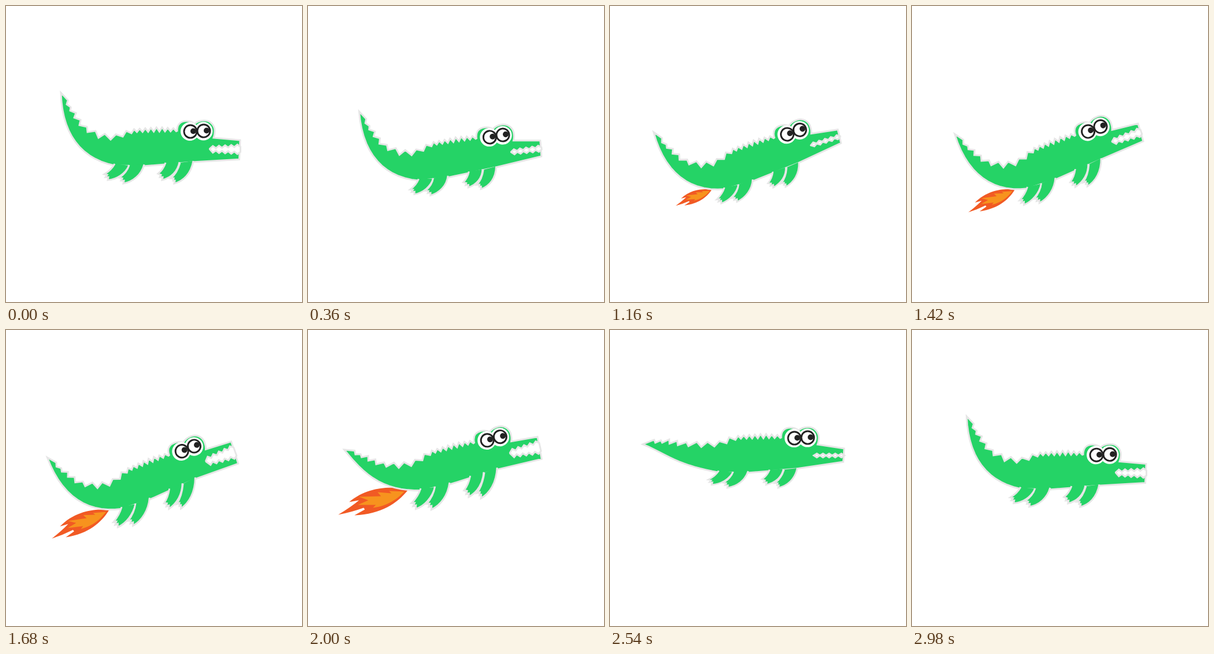
Animation of 512x512 px, one loop 3000 ms. Source, as an HTML page:

```html
<!DOCTYPE html>
<html lang="en">
<head>
<meta charset="utf-8">
<title>Rocket crocodile</title>
<style>
  html, body { margin: 0; width: 100%; height: 100%; overflow: hidden; background: #fff; }
  svg { display: block; width: 100vw; height: 100vh; }
  .skin { fill: #25d366; }
  .line { stroke: #e6e6e6; stroke-width: 3; stroke-miterlimit: 6; }
  .white { fill: #fff; }
  .ink { fill: #222; }
</style>
</head>
<body>
<svg viewBox="0 0 512 512">
  <g id="croc">
    <g id="flame">
      <path fill="#f15a24" d="M0 0C-18 -7 -65 -10 -101 20L-84 17Q-97 28 -120 42Q-98 38 -76 30L-74 33L-92 43C-45 41 -18 22 0 0Z"/>
      <path fill="#f7931e" d="M-6 2L-32 1L-28 5L-52 3L-46 10L-84 11L-68 17L-86 25L-55 25L-60 30C-35 27 -18 15 -6 2Z"/>
    </g>
    <path id="body" class="skin line"/>
    <g id="legs" class="skin line">
      <path d="M188 273Q182 284 170 291L175 292L172 296L177 296L176 301C192 300 206 290 213 276"/>
      <path d="M213 275Q209 288 196 297L201 298L199 302L204 302L203 307C220 304 234 292 239 274"/>
      <path d="M276 271Q272 283 263 290L268 292L266 296L271 296L270 301C286 297 297 286 300 270"/>
      <path d="M301 271Q296 289 285 298L290 298L289 302L292 302L291 307C307 303 320 290 324 268"/>
    </g>
    <path id="mouth" class="white line"/>
    <g id="eyes">
      <circle class="white" cx="318" cy="217" r="16"/>
      <circle class="white" cx="341.5" cy="216.5" r="16"/>
      <circle class="ink" cx="319" cy="217" r="12.5"/>
      <circle class="white" cx="319" cy="217" r="9.6"/>
      <circle class="ink" cx="324" cy="216.5" r="5"/>
      <circle class="ink" cx="342" cy="216" r="12.5"/>
      <circle class="white" cx="342" cy="216" r="9.6"/>
      <circle class="ink" cx="347" cy="215.5" r="5"/>
    </g>
  </g>
</svg>
<script>
  const LOOP = 3000;
  const byId = id => document.getElementById(id);
  const croc = byId('croc'), flame = byId('flame'), body = byId('body'),
        legs = byId('legs'), mouth = byId('mouth');

  const times = [0, 360, 800, 1160, 1680, 2000, 2170, 2350, 2540, 2760];
  const keys = {
    y:    [0, 17.6, 23, 22, 12, -13, -28, -36, -30, -14],
    turn: [0, -7.2, -13, -17, -19.7, -12.8, -8, -3, 0, 0],
    tail: [0, 3.1, 3, 2.3, 0.7, -13.8, -26, -36, -34.8, -11],
    leg:  [1, 0.91, 0.87, 0.88, 1.09, 1.17, 1.12, 0.97, 0.87, 0.92],
    skew: [0, 0.05, 0.02, -0.04, -0.22, -0.155, -0.1, -0.04, 0, 0],
    jaw:  [0.6, 0.25, 0.05, 0.05, 1, 0.95, 0.75, 0.3, 0, 0.15]
  };
  const burn = [[700, 0], [1160, 0.53], [1680, 0.863], [2000, 1], [2190, 1.14], [2420, 0]];

  // Smooth periodic curve through the keys
  function curve(v, t) {
    const n = times.length;
    const at = i => times[(i + n) % n] + LOOP * Math.floor(i / n);
    const val = i => v[(i + n) % n];
    const slope = i => (val(i + 1) - val(i - 1)) / (at(i + 1) - at(i - 1));
    let i = n - 1;
    while (times[i] > t) i--;
    const d = at(i + 1) - at(i), u = (t - at(i)) / d, w = 1 - u;
    return val(i) * w * w * (1 + 2 * u) + val(i + 1) * u * u * (3 - 2 * u)
      + d * u * w * (slope(i) * w - slope(i + 1) * u);
  }

  function linear(pts, t) {
    for (let i = 1; i < pts.length; i++) {
      const [a, p] = pts[i - 1], [b, q] = pts[i];
      if (t >= a && t < b) return p + (q - p) * (t - a) / (b - a);
    }
    return 0;
  }

  // Upper tail edge from the tip to the back
  const ridge = [
    [95, 150], [107, 163], [105, 170], [112, 175], [111, 181], [121, 185],
    [118, 193], [129, 197], [127, 206], [140, 209], [141, 218], [155, 216],
    [160, 228], [171, 221], [181, 231], [190, 222], [202, 226], [208, 216]
  ];
  const back = [[217, 220]];
  for (let i = 0; i < 8; i++) {
    const x = 221.5 + 9.7 * i;
    back.push([x, 209.5 + Math.abs(i - 4.5) * 0.8], [x + 5, 218 - i * 0.2]);
  }

  const under = [];
  for (let i = 0; i < 14; i++) {
    const t = i / 14, s = 1 - t;
    const mix = (a, b, c, d) => a * s ** 3 + 3 * b * s * s * t + 3 * c * s * t * t + d * t ** 3;
    under.push([mix(188, 130, 97, 95), mix(276, 264, 222, 150)]);
  }

  // Swing a tail point around the hip, more so towards the tip
  function bend([x, y], angle) {
    const dx = 200 - x, dy = 250 - y, r = Math.hypot(dx, dy);
    const a = Math.atan2(dy, dx)
      + angle * Math.PI / 180 * Math.max(0, (r - 20) / 125) ** 1.1;
    return [200 - r * Math.cos(a), 250 - r * Math.sin(a)];
  }

  const join = pts => pts.map(p => p.map(n => n.toFixed(2)).join(' ')).join('L');

  function bodyPath(tail, jaw) {
    const swing = p => bend(p, tail);
    return 'M' + join([...ridge.map(swing), ...back, [296, 216]])
      + 'C296 203 304 199 312 199Q321 199 326 204C331 199 337 198 343 198'
      + 'C354 198 362 207 361 218Q361 223 359 228'
      + 'L' + join([[405, 235 - 5 * jaw], [403.5, 258 + 12 * jaw], [322, 270], [238, 277],
        ...under.map(swing)]) + 'Z';
  }

  function mouthPath(jaw) {
    const top = [], low = [], size = 3.3 + 1.2 * jaw;
    for (let i = 0; i <= 10; i++) {
      const s = i / 10, x = 352.5 + 5.3 * i, tooth = i % 2 * size;
      const end = i === 0 ? 0.3 : 1;
      top.push([x, 247 - tooth - jaw * (1 + 5 * s) * end]);
      low.unshift([x, 247 + tooth + jaw * (4 + 5 * s) * end]);
    }
    return 'M' + join([...top, ...low]) + 'Z';
  }

  function draw(t) {
    const k = {};
    for (const name in keys) k[name] = curve(keys[name], t);
    const jaw = Math.max(0, k.jaw), heat = linear(burn, t);
    croc.setAttribute('transform', `translate(0 ${k.y}) rotate(${k.turn} 256 250)`);
    legs.setAttribute('transform',
      `translate(0 275) matrix(1 0 ${k.skew} ${k.leg} 0 0) translate(0 -275)`);
    flame.setAttribute('transform', `translate(165.5 271) rotate(12.8) scale(${heat})`);
    flame.style.display = heat > 0 ? '' : 'none';
    body.setAttribute('d', bodyPath(k.tail, jaw));
    mouth.setAttribute('d', mouthPath(jaw));
  }

  const start = performance.now();
  function tick() {
    draw((performance.now() - start) % LOOP);
    requestAnimationFrame(tick);
  }
  tick();
</script>
</body>
</html>
```
